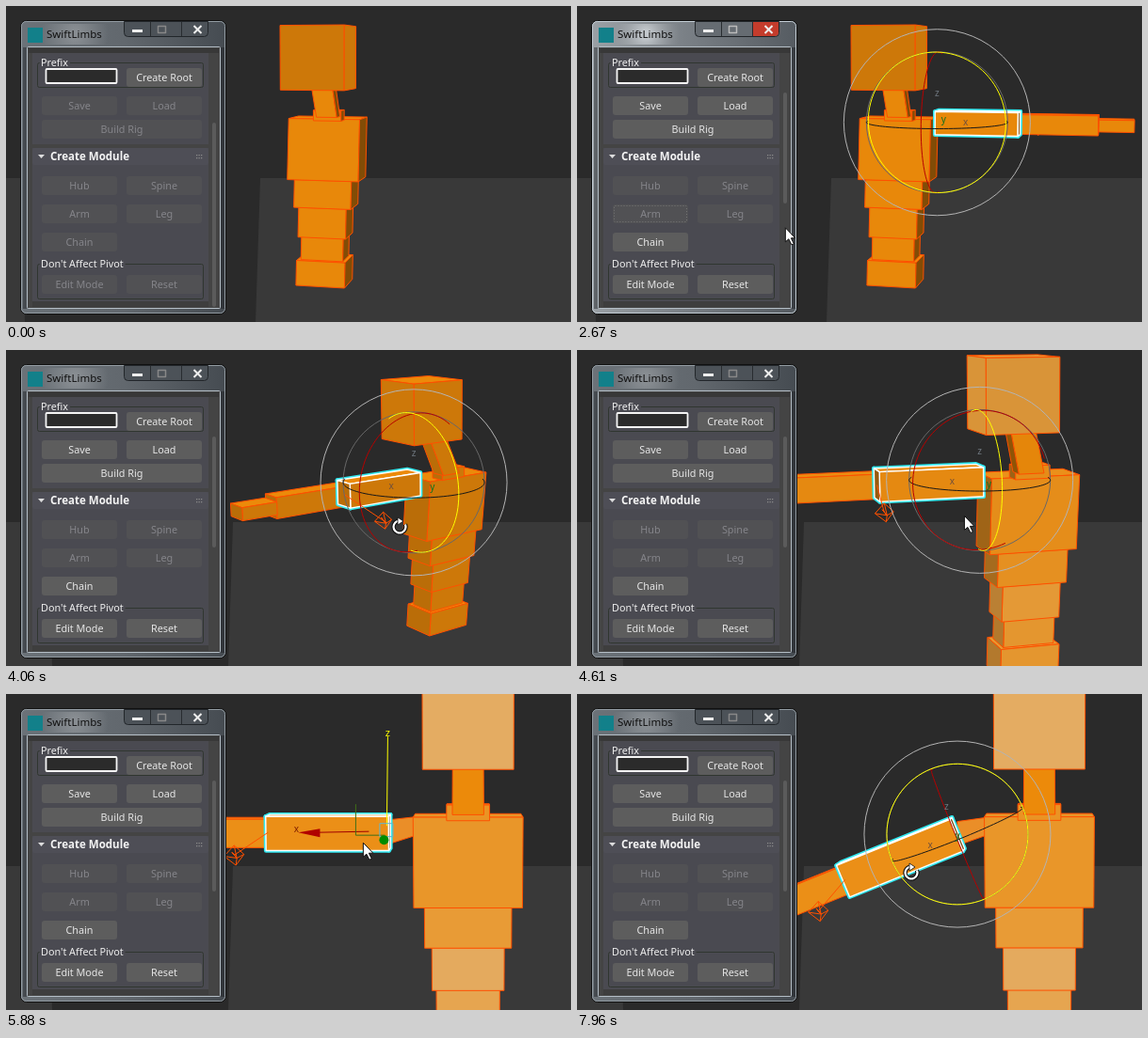
These frames come from a looping animation (600 px wide and 336 px high, 8000 ms). An HTML page with a canvas:

```html
<!DOCTYPE html>
<html lang="en">
<head>
<meta charset="utf-8">
<title>Rigging demo</title>
<style>
  html, body { margin: 0; width: 100%; height: 100%; overflow: hidden; background: #2a2a2a; }
  canvas { display: block; width: 600px; height: 336px; }
</style>
</head>
<body>
<canvas id="stage" width="600" height="336"></canvas>
<script>
const ctx = document.getElementById('stage').getContext('2d');
const { sin, cos, PI } = Math;
const LOOP = 8000, WIRE = '#ff5000';
const FONT = '"Noto Sans", "Open Sans", sans-serif';

// ---------- helpers ----------
const mix = (a, b, k) => Array.isArray(a) ? a.map((v, i) => mix(v, b[i], k)) : a + (b - a) * k;
const clamp = k => Math.min(1, Math.max(0, k));
const progress = (t, start, end) => clamp((t - start) / (end - start));
const rgb = c => `rgb(${c.map(Math.round).join()})`;

// keys: [time, value] pairs, linear in between
function sample(keys, t) {
  const next = keys.findIndex(key => key[0] > t);
  if (next === 0) return keys[0][1];
  if (next < 0) return keys[keys.length - 1][1];
  const [t0, a] = keys[next - 1], [t1, b] = keys[next];
  return mix(a, b, progress(t, t0, t1));
}

function poly(points, fill, stroke, width = 1, closed = true) {
  ctx.beginPath();
  points.forEach(([x, y]) => ctx.lineTo(x, y));
  if (closed) ctx.closePath();
  if (fill) { ctx.fillStyle = fill; ctx.fill(); }
  if (stroke) { ctx.strokeStyle = stroke; ctx.lineWidth = width; ctx.stroke(); }
}
const line = (points, color, width) => poly(points, null, color, width, false);

function circle(x, y, r, fill, stroke) {
  ctx.beginPath();
  ctx.arc(x, y, r, 0, 2 * PI);
  if (fill) { ctx.fillStyle = fill; ctx.fill(); }
  if (stroke) { ctx.strokeStyle = stroke; ctx.lineWidth = 1; ctx.stroke(); }
}
function rect(x, y, w, h, fill) {
  ctx.fillStyle = fill;
  ctx.fillRect(x, y, w, h);
}
function rounded(x, y, w, h, r, fill, stroke, width = 1) {
  ctx.beginPath();
  ctx.roundRect(x, y, w, h, r);
  if (fill) { ctx.fillStyle = fill; ctx.fill(); }
  if (stroke) { ctx.strokeStyle = stroke; ctx.lineWidth = width; ctx.stroke(); }
}
function text(str, x, y, color, size = 10.8, align = 'left', weight = 400) {
  ctx.font = `${weight} ${size}px ${FONT}`;
  ctx.textAlign = align;
  ctx.textBaseline = 'middle';
  ctx.fillStyle = color;
  ctx.fillText(str, x, y);
}

// ---------- camera ----------
// yaw, pitch, zoom, and the screen position of the chest
const CAMERA = [
  [2790, [.23, .09, 1, 341.5, 140]],
  [3450, [1.1, .22, .95, 361, 147]],
  [4060, [2.45, .22, 1, 466, 152]],
  [5100, [PI, .1, 1.5, 489, 162]],
  [5220, [PI, .1, 1.5, 489, 162]],
  [6000, [PI, .08, 1.5, 491, 160]]
];
const DISTANCE = 1000;
let yaw, pitch, zoom, centerX, centerY;

function rotate([x, y, z]) {
  const depth = x * sin(yaw) + z * cos(yaw);
  return [x * cos(yaw) - z * sin(yaw),
    y * cos(pitch) - depth * sin(pitch),
    y * sin(pitch) + depth * cos(pitch)];
}
function project(point) {
  const [x, y, z] = rotate(point), k = zoom / (1 - z / DISTANCE);
  return [centerX + x * k, centerY - y * k];
}

// ---------- boxes ----------
// corner index bits: 1 = right, 2 = top, 4 = front
const FACES = [
  { ids: [0, 1, 5, 4], normal: [0, -1, 0] }, { ids: [6, 7, 3, 2], normal: [0, 1, 0] },
  { ids: [4, 5, 7, 6], normal: [0, 0, 1] }, { ids: [1, 0, 2, 3], normal: [0, 0, -1] },
  { ids: [5, 1, 3, 7], normal: [1, 0, 0] }, { ids: [0, 4, 6, 2], normal: [-1, 0, 0] }
];
const isFacing = pts => pts.reduce((area, [x, y], i) => {
  const [nx, ny] = pts[(i + 1) % pts.length];
  return area + x * ny - nx * y;
}, 0) < 0;

function faceColor([x, y, z], { tone, glow = 0 }) {
  const light = y ? .75 + y * .25 : tone || .42 + .58 * (x * sin(yaw) + z * cos(yaw));
  const base = [236 * light, 138 * light, 10 * light];
  return rgb(mix(base, [228, 172, 98], glow * clamp((zoom - 1) * 2)));
}

function drawBox(box, selected) {
  const corners = box.corners.map(project);
  const visible = FACES
    .map(face => ({ ...face, points: face.ids.map(i => corners[i]) }))
    .filter(face => isFacing(face.points));
  if (selected) visible.forEach(face => poly(face.points, null, '#30e8f0', 4.5));
  visible.forEach(face =>
    poly(face.points, faceColor(face.normal, box), selected ? '#fff' : WIRE, selected ? 1.4 : 1));
}

const eightCorners = corner => Array.from({ length: 8 }, (_, i) =>
  corner(i & 1 ? 1 : -1, i & 2 ? 1 : -1, i & 4 ? 1 : -1));

function bodyBox(w, d, top, bottom, zTop, zBottom, look) {
  const corners = eightCorners((i, j, k) =>
    [i * w / 2, j > 0 ? top : bottom, (j > 0 ? zTop : zBottom) + k * d / 2]);
  return { corners, ...look };
}

// trunk boxes are stacked downwards and lean forward
function buildBody() {
  const body = [];
  const lean = y => (21 - y) * .1 - 3;
  let top = 21;
  [[76, 40, 64, .35], [61, 38, 29, .5], [51, 36, 31, .95], [45, 30, 24, .8], [52, 40, 26, .8]]
    .forEach(([w, d, height, glow]) => {
      const bottom = top - height;
      body.unshift(bodyBox(w, d, top, bottom, lean(top), lean(bottom), { glow }));
      top = bottom;
    });
  return [...body,
    bodyBox(30, 16, 29, 18, -6, -6, { glow: .3 }),
    bodyBox(22, 16, 58, 22, 20, -3, {}),
    bodyBox(65, 57, 117, 53, 39, 39, { tone: .87, glow: 1 })];
}
const BODY = buildBody();

// ---------- arm ----------
const SWING = [[7000, 0], [7800, .61], [7960, .385]];
// start, end, half height, half depth
const SEGMENTS = [[0, 86, 12, 11], [86, 166, 10, 10], [166, 201, 6, 11]];

function armAt(t) {
  const slide = progress(t, 5220, 6000), swing = sample(SWING, t);
  const shoulder = [41.5 + 16.5 * slide, 17 - 9.7 * slide, 0];
  const turn = ([x, y, z]) =>
    [x * cos(swing) + y * sin(swing), y * cos(swing) - x * sin(swing), z];
  const place = point => turn(point).map((v, i) => v + shoulder[i]);
  return { shoulder, turn, place, slide };
}

function drawPole({ place }) {
  const [x, y] = project(place([97, -9, -80])), r = 9 * zoom ** .4;
  const rim = [[x - r, y + 1], [x, y - r], [x + r, y - 1], [x + 2, y + r]];
  line([project(place([86, 0, 0])), [x, y]], WIRE);
  poly(rim, null, WIRE);
  rim.forEach(point => line([point, [x + 3, y + 3], [x - 2, y - 3]], WIRE));
}

function drawArm(arm) {
  const boxes = SEGMENTS.map(([start, end, h, d]) => ({
    corners: eightCorners((i, j, k) => arm.place([i > 0 ? end : start, j * h, k * d])),
    glow: .15
  }));
  if (cos(yaw) > 0) drawPole(arm);
  const order = boxes.slice(1);
  if (cos(yaw) > .9) order.reverse();
  drawBox(boxes[0]);
  order.forEach(box => drawBox(box));
  drawBox(boxes[0], true);
  if (cos(yaw) <= 0) drawPole(arm);
}

function drawLink({ shoulder: [x, y] }) {
  const outline = [[x, y + 9], [17, 22], [17, 14], [39, 6], [x, y - 8]];
  poly(outline.map(([px, py]) => project([px, py, 0])), '#ea8e28', WIRE);
}

// ---------- manipulators ----------
function drawRing(x, y, axis, turn, color) {
  ctx.beginPath();
  let open = false;
  for (let i = 0; i <= 96; i++) {
    const a = i / 96 * 2 * PI, point = [0, 0, 0];
    point[(axis + 1) % 3] = cos(a);
    point[(axis + 2) % 3] = sin(a);
    const [dx, dy, depth] = rotate(turn(point));
    const near = depth > -.27;
    if (near) ctx[open ? 'lineTo' : 'moveTo'](x + 75 * dx, y - 75 * dy);
    open = near;
  }
  ctx.strokeStyle = color;
  ctx.lineWidth = 1;
  ctx.stroke();
}

function drawRotateTool(t, { shoulder, turn }) {
  const [x, y] = project(shoulder);
  const tilted = t > 2900 && t < 6300;
  circle(x, y, 75, null, '#686868');
  circle(x, y, 99, null, '#b4b4b4');
  drawRing(x, y, 1, turn, '#181818');
  drawRing(x, y, tilted ? 2 : 0, turn, tilted && t < 3500 ? '#009000' : '#b80000');
  drawRing(x, y, tilted ? 0 : 2, turn, '#ffff00');
  [['z', [0, 1, 0], '#707880'], ['y', [0, 0, -1], '#107020'], ['x', [1, 0, 0], '#70503c']]
    .forEach(([label, axis, color]) => {
      const [dx, dy] = rotate(turn(axis));
      text(label, x + dx * 31, y - dy * 31, color, 10, 'center');
    });
}

function drawMoveTool({ shoulder }) {
  const [x, y] = project(shoulder);
  line([[x - 3, y - 7], [x - 2, y - 102]], '#ffff00');
  text('z', x - 2, y - 105, '#ffff00', 11, 'center');
  line([[x - 22, y - 1], [x - 75, y]], '#a00000');
  poly([[x - 97, y], [x - 74, y - 4], [x - 74, y + 5]], '#b00000');
  text('x', x - 99, y - 3, '#802000', 10, 'center');
  line([[x - 36, y - 30], [x - 36, y + 3], [x - 5, y + 3]], '#407018');
  ctx.strokeStyle = '#60b8d0';
  ctx.strokeRect(x - 10.5, y - 9.5, 14, 14);
  circle(x - 6, y + 8, 5, '#008c00');
}

function drawScene(t) {
  rect(0, 0, 600, 336, '#2a2a2a');
  rect(0, 183, 600, 153, '#393939');
  const spread = t < 2900 ? 270 : 241;
  poly([[286 - spread, 183], [spread, 183], [spread - 5, 336], [290 - spread, 336]], '#2a2a2a');

  [yaw, pitch, zoom, centerX, centerY] = sample(CAMERA, t);
  const arm = armAt(t);
  if (arm.slide) drawLink(arm);
  BODY.forEach(box => drawBox(box));
  if (t < 2410) return;
  drawArm(arm);
  if (t >= 4700 && t < 6300) drawMoveTool(arm);
  else drawRotateTool(t, arm);
}

// ---------- tool window ----------
// label, column, y, group
const BUTTONS = [
  ['Create Root', 1, 66, 'root'], ['Save', 0, 96, 'main'], ['Load', 1, 96, 'main'],
  ['Build Rig', 0, 121, 'main'], ['Hub', 0, 181, 'module'], ['Spine', 1, 181, 'module'],
  ['Arm', 0, 211, 'module'], ['Leg', 1, 211, 'module'], ['Chain', 0, 241, 'main'],
  ['Edit Mode', 0, 286, 'main'], ['Reset', 1, 286, 'main']
];

function groupBox(label, y, h) {
  rounded(33.5, y + .5, 176, h, 2, null, '#303630');
  ctx.font = `10.8px ${FONT}`;
  rect(36, y - 2, ctx.measureText(label).width + 3, 5, '#4a4a51');
  text(label, 37, y + .5, '#eee');
}

function drawFrame(active) {
  const glass = ctx.createLinearGradient(16, 0, 234, 0);
  (active ? ['#9aa0a5', '#777d83', '#555b61'] : ['#6b7278', '#62686e', '#454b51'])
    .forEach((color, i) => glass.addColorStop(i / 2, color));
  rounded(15.5, 15.5, 218, 312, 6, glass, '#111');
  rounded(16.5, 16.5, 216, 310, 5, null, active ? '#c4ced6' : '#939ca3');
  rect(18, 44, 4, 278, 'rgba(25,28,31,.45)');
  rect(228, 44, 4, 278, 'rgba(25,28,31,.45)');

  const glow = ctx.createRadialGradient(73, 30, 4, 73, 30, 36);
  glow.addColorStop(0, active ? 'rgba(215,220,224,.75)' : 'rgba(160,164,168,.6)');
  glow.addColorStop(1, 'rgba(160,164,168,0)');
  rect(38, 19, 72, 22, glow);
  rect(23, 23, 16, 16, '#12808a');
  text('SwiftLimbs', 43, 30.5, '#101010', 11.5);

  rounded(125.5, 16.5, 89, 16, [0, 0, 4, 4], active ? '#666c72' : '#4c5258', '#22262a');
  if (active) rounded(187, 17, 27, 15, [0, 0, 4, 0], '#c43c2c');
  [153.5, 186.5].forEach(x => line([[x, 17], [x, 32]], '#282c30'));
  rect(134, 25, 11, 3, '#eee');
  ctx.strokeStyle = active ? '#bbb' : '#888';
  ctx.lineWidth = 1.5;
  ctx.strokeRect(161.5, 21.5, 8, 7);
  line([[199.5, 21], [207.5, 29]], '#eee', 2);
  line([[207.5, 21], [199.5, 29]], '#eee', 2);
}

function drawButton([label, column, y, group], t) {
  const x = column ? 128 : 38, w = label === 'Build Rig' ? 170 : 80;
  const enabled = group === 'root' || t >= 950 && (group === 'main' || t < 2410);
  const pressed = label === 'Arm' && t >= 2080 && t < 2210;
  rounded(x, y, w, 20, 3, pressed ? '#2b2b2b' : enabled ? '#5d5d5d' : '#515154');
  text(label, x + w / 2, y + 10.8, enabled ? '#e6e6e6' : '#85858a', 10.8, 'center');
}

function drawWindow(t) {
  drawFrame(t >= 2020 && t < 2900);
  rounded(22.5, 43.5, 205, 278, 1, '#444', '#b4bec6');
  rect(24, 45, 202, 5, '#383838');
  rect(28, 50, 187, 97, '#4a4a51');
  rect(28, 151, 187, 163, '#4a4a51');
  rounded(28, 151, 187, 18, 2, '#4e4e56');
  rect(28, 314, 187, 6, '#3e3e3e');
  const expanded = t >= 950;
  rounded(219, expanded ? 92 : 124, 4, expanded ? 118 : 196, 2, '#5b5b5b');

  groupBox('Prefix', 60, 26);
  groupBox("Don't Affect Pivot", 274, 37);
  rounded(42.5, 67, 75, 15, 1, '#2b2b2b', '#f4f4f4', 1.8);
  poly([[34, 158], [41, 158], [37.5, 162]], '#ddd');
  text('Create Module', 47, 160.5, '#f4f4f4', 11.5, 'left', 700);
  for (let i = 0; i < 6; i++) rect(202 + i % 3 * 2.5, 158 + (i > 2) * 3, 1.3, 1.3, '#888');

  BUTTONS.forEach(button => drawButton(button, t));
  if (t >= 2210 && t < 2900) {
    ctx.setLineDash([1, 2]);
    rounded(39.5, 212.5, 77, 17, 1, null, '#777');
    ctx.setLineDash([]);
  }
}

// ---------- cursor ----------
// each move: start, end, destination
const MOVES = [
  [330, 750, [428, 264]], [1400, 1820, [75, 218]], [2210, 2640, [221, 236]],
  [2670, 2900, [290, 190]], [2900, 3450, [211, 240]], [3510, 4060, [418, 188]],
  [4360, 5160, [397, 151]], [5400, 6000, [375, 160]], [6130, 6680, [389, 96]],
  [7000, 7800, [340, 206]], [7840, 7960, [355, 190]]
];
const ARROW = [[0, 0], [0, 15], [3.5, 12], [6.5, 18], [9, 17], [6, 11], [10.5, 11]];

function drawCursor(t) {
  if (t < 330) return;
  const [x, y] = MOVES.reduce((at, [start, end, to]) => mix(at, to, progress(t, start, end)), [541, 304]);
  const tumbling = t >= 2900 && t < 4400 || t >= 6560;
  if (!tumbling) {
    poly(ARROW.map(([dx, dy]) => [x + dx, y + dy]), '#fff', '#111');
    return;
  }
  [['#111', 4.5], ['#fff', 2.2]].forEach(([color, width]) => {
    ctx.beginPath();
    ctx.arc(x, y, 6.5, -.4, PI * 1.4);
    ctx.strokeStyle = color;
    ctx.lineWidth = width;
    ctx.stroke();
  });
  poly([[x - 2, y - 10], [x + 4, y - 6], [x - 2, y - 2]], '#fff', '#111', .8);
}

function frame() {
  const t = performance.now() % LOOP;
  ctx.lineJoin = 'round';
  drawScene(t);
  drawWindow(t);
  drawCursor(t);
  requestAnimationFrame(frame);
}
frame();
</script>
</body>
</html>
```
